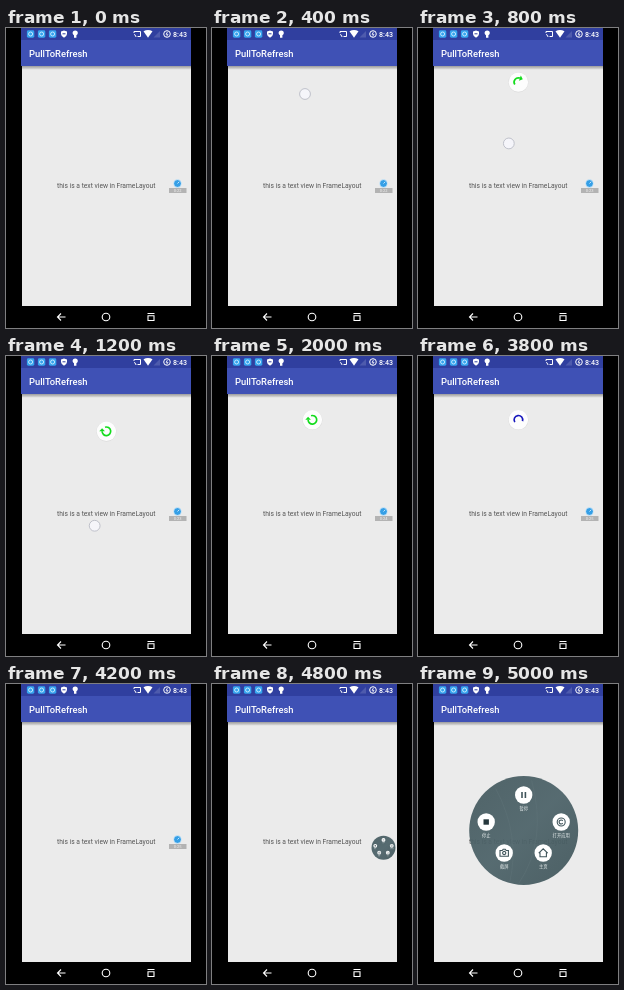
These frames come from a looping animation (200x300 px, 5.2 s). An HTML page:

```html
<!DOCTYPE html>
<html>
<head>
<meta charset="utf-8">
<style>
html, body { margin: 0; height: 100%; overflow: hidden; background: #000; }
svg { display: block; width: 100vw; height: 100vh; }
text { font-family: Roboto, sans-serif; }
#menu text { font: 4.3px "Noto Sans CJK SC", "Noto Sans CJK", sans-serif; fill: #e8eeee; text-anchor: middle; }
</style>
</head>
<body>
<svg viewBox="0 0 200 300">
  <defs>
    <linearGradient id="shade" x2="0" y2="1">
      <stop stop-color="#000" stop-opacity=".34"/>
      <stop offset="1" stop-color="#000" stop-opacity=".04"/>
    </linearGradient>
    <linearGradient id="slate" x2="1" y2="1">
      <stop stop-color="#465b60"/>
      <stop offset=".5" stop-color="#4d6369"/>
      <stop offset="1" stop-color="#42575c"/>
    </linearGradient>
    <g id="app">
      <rect x="-3.7" y="-3.7" width="7.4" height="7.4" rx="1.4" fill="#35a4ee"/>
      <circle r="2" fill="none" stroke="#d5efff" stroke-width=".9"/>
    </g>
  </defs>

  <rect width="200" height="300"/>
  <rect x="16" y="38" width="169" height="240" fill="#ebebeb"/>
  <rect x="16" y="38" width="169" height="3.6" fill="url(#shade)"/>
  <text x="51" y="160.3" font-size="6.7" fill="#555">this is a text view in FrameLayout</text>

  <g id="puller">
    <circle r="10.1" cy=".3" fill="#000" opacity=".06"/>
    <circle r="9.7" fill="#fdfdfd"/>
    <path id="arc" fill="none" stroke-width="1.7"/>
    <path id="tip" d="M1.5 0H7.1L4.3 3.1Z"/>
  </g>

  <rect x="15" y="12" width="170" height="26" fill="#3f51b5"/>
  <rect x="15" width="170" height="12" fill="#303f9f"/>
  <text x="23" y="28.6" font-size="9.4" font-weight="500" fill="#fff">PullToRefresh</text>

  <use href="#app" x="24.6" y="6"/>
  <use href="#app" x="35.6" y="6"/>
  <use href="#app" x="46.6" y="6"/>
  <g fill="#fff">
    <path d="M58 2.4L61 3.6V6Q60.8 8.5 58 9.8Q55.2 8.5 55 6V3.6Z"/>
    <path d="M56.5 5.8H59.5" stroke="#303f9f"/>
    <path d="M68 7.3A2.6 2.6 0 1 1 70.4 7.3V9.8H68Z"/>
    <path d="M137.5 3.2L142 9.8L146.5 3.2Q142 .8 137.5 3.2Z"/>
    <path d="M147.5 9.5L154 3V9.5Z" opacity=".15"/>
    <text x="167" y="8.7" font-size="7.1" font-weight="500">8:43</text>
  </g>
  <g fill="none" stroke="#fff">
    <path d="M128 5V3.5H134.5V8.5H131.5M128 6.5Q130 6.8 130 9"/>
    <circle cx="161" cy="6" r="3.3"/>
    <path d="M161.6 3.8L160 6.3H162L160.6 8.4" stroke-width=".8"/>
    <g stroke-width="1.1">
      <path d="M59.5 289H51.5M55 285.5L51.5 289L55 292.5"/>
      <circle cx="100" cy="289" r="3.8"/>
      <path d="M142 287.7H148V292.5H142ZM141.5 285.5H148.5"/>
    </g>
  </g>

  <g id="widget">
    <rect x="163" y="160" width="17.5" height="5" fill="#b3b3b3"/>
    <circle cx="171.5" cy="155.5" r="3.9" fill="#359fe6" stroke="#fff" stroke-width=".6"/>
    <path d="M171.5 155.5L173.3 153.7" stroke="#d5efff" stroke-width=".9"/>
    <text id="clock" x="171.6" y="163.9" font-size="4" text-anchor="middle" fill="#f2f2f2"></text>
  </g>
  <circle id="touch" r="5.4" fill="#f5f5fa" stroke="#b9bbc6" stroke-width=".9"/>

  <g id="menu">
    <circle r="54.5" fill="url(#slate)" opacity=".94"/>
    <path d="M-14 52Q-3 5 -28 -42M-5 53Q24 10 8 -50" fill="none" stroke="#62777c" opacity=".4"/>
  </g>
</svg>
<script>
const LOOP = 5200, STEP = 200, SWEEP = 288, R = 4.3;
const $ = id => document.getElementById(id);
const set = (id, attrs) => {
  for (const k in attrs) $(id).setAttribute(k, attrs[k]);
};
const show = (id, on) => set(id, { display: on ? "inline" : "none" });
const part = (t, from, to) => Math.max(0, Math.min(1, (t - from) / (to - from)));
const ease = s => s * s * (3 - 2 * s);

// menu buttons: x, y, label, icon
const line = 'fill="none" stroke="#40555b" stroke-width="1.1"';
const buttons = [
  [0, -35.5, "暂停", '<path d="M-1.7-3V3M1.7-3V3" stroke="#40555b" stroke-width="1.6"/>'],
  [-37.5, -8.5, "停止", '<rect x="-2.7" y="-2.7" width="5.4" height="5.4" fill="#26383d"/>'],
  [37.5, -8.5, "打开应用", `<circle r="4" ${line}/><path d="M1.5-1.2A2 2 0 1 0 1.5 1.2" ${line}/>`],
  [-19.5, 22.5, "截屏", `<path d="M-4.2-2.5H-2L-1-3.8H1L2-2.5H4.2V3.3H-4.2Z" ${line}/><circle r="1.6" ${line}/>`],
  [19.5, 22.5, "主页", `<path d="M-4.5 .2L0-4.2L4.5 .2M-3.2-.5V3.8H3.2V-.5" ${line}/>`]
];
$("menu").innerHTML += buttons.map(([x, y, label, icon]) =>
  `<g transform="translate(${x} ${y})"><circle r="8.7" fill="#fff"/>${icon}<text y="14.6">${label}</text></g>`).join("");

function finger(t) {
  const s = part(t, 400, 1600);
  return { x: 93 - 6.5 * s, y: 66 + 141 * (s + 0.7 * s ** 3 * (1 - s)) };
}

// The circle follows the finger down to a limit, then springs back a little.
const dropY = t => Math.min(75.3, 41 + 0.48 * (finger(t).y - 88)) - 11.5 * part(t, 1600, 2000);

// Tail and head angles: grow with the pull, shrink on release, then grow and shrink while turning.
function ring(t) {
  const pull = part(t, 400, 1200);
  if (pull < 1) {
    const tail = 40 + 212 * pull;
    return [tail, tail + SWEEP * pull];
  }
  const turn = 540 + 0.15 * Math.max(0, t - 2000);
  return [
    turn + SWEEP * (part(t, 2000, 2800) - 1 + ease(part(t, 3600, 4300))),
    turn + SWEEP * ease(part(t, 2900, 3500))
  ];
}

function drawPuller(t) {
  const [tail, head] = ring(t);
  const point = deg => {
    const a = deg * Math.PI / 180;
    return `${R * Math.cos(a)} ${R * Math.sin(a)}`;
  };
  const color = t < 2900 ? "#12dc1c" : "#1717bd";
  set("puller", { transform: `translate(100.4 ${dropY(t)})` });
  set("arc", {
    d: `M${point(tail)}A${R} ${R} 0 ${head - tail > 180 ? 1 : 0} 1 ${point(head)}`,
    stroke: color
  });
  set("tip", { transform: `rotate(${head})`, fill: color });
  show("tip", t <= 2000);
}

function frame(now) {
  const t = Math.floor(now % LOOP / STEP) * STEP;
  const { x, y } = finger(t);
  show("touch", t >= 400 && t < 1800);
  set("touch", { transform: `translate(${x} ${y})` });
  show("puller", t >= 600 && t < 4200);
  drawPuller(t);
  show("widget", t < 4800);
  $("clock").textContent = "0:2" + (2 + Math.floor((t + 600) / 1300));
  show("menu", t >= 4800);
  set("menu", {
    transform: t < 5000 ? "translate(171.5 163.7) scale(.22)" : "translate(105.7 146.5)"
  });
}

const start = performance.now();
function tick(now) {
  frame(Math.max(0, now - start));
  requestAnimationFrame(tick);
}
requestAnimationFrame(tick);
</script>
</body>
</html>
```
